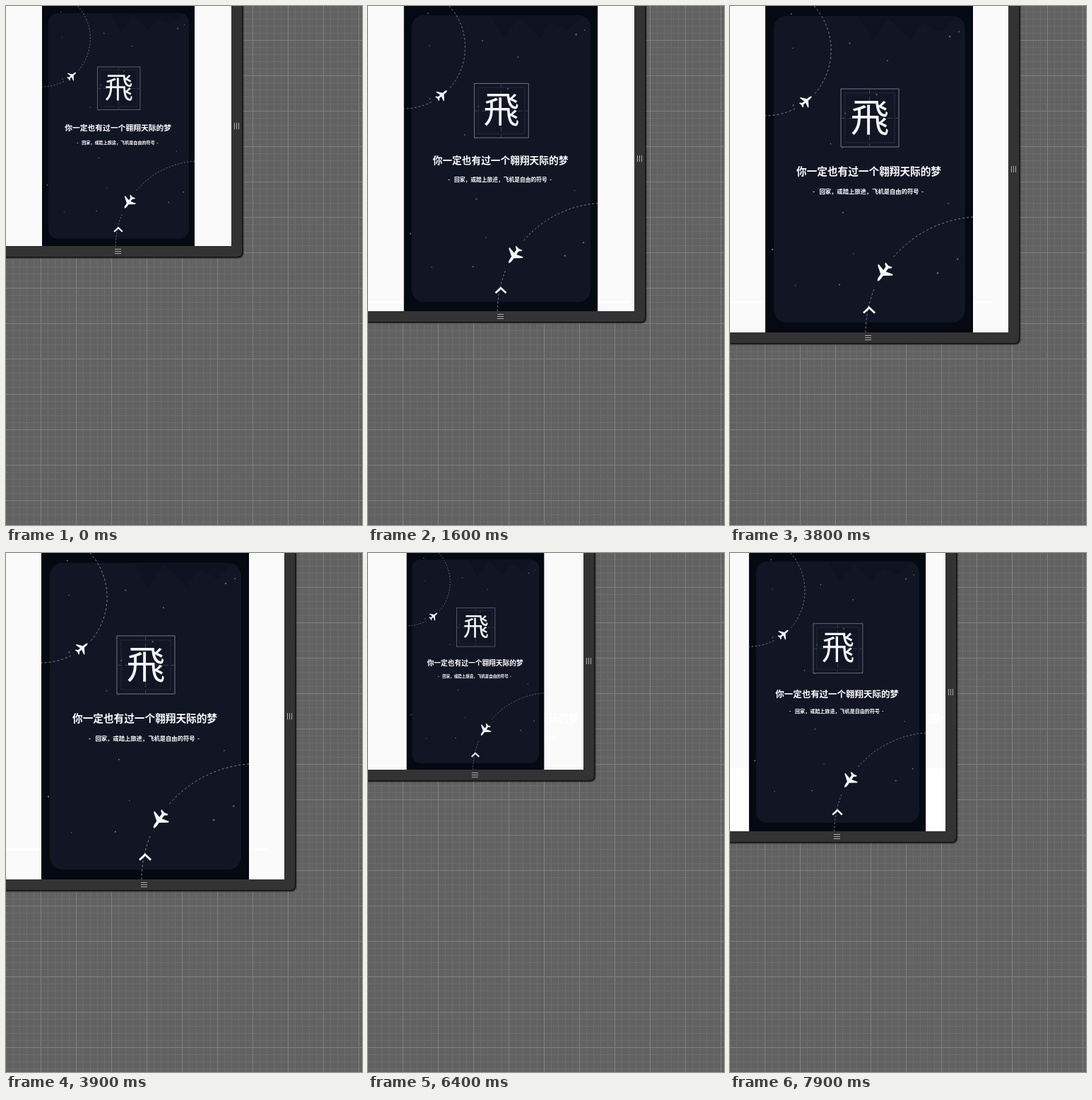
These frames come from a looping animation (504x733 px, 8000 ms). An HTML page:

```html
<!DOCTYPE html>
<html lang="zh-CN">
<head>
<meta charset="utf-8">
<title>Responsive poster</title>
<style>
html, body { margin: 0; width: 100%; height: 100%; overflow: hidden; }
body {
  position: relative;
  background:
    linear-gradient(#808080 1px, transparent 1px) 49px 48px / 50px 50px,
    linear-gradient(90deg, #808080 1px, transparent 1px) 49px 48px / 50px 50px,
    linear-gradient(#6c6c6c 1px, transparent 1px) 9px 8px / 10px 10px,
    linear-gradient(90deg, #6c6c6c 1px, transparent 1px) 9px 8px / 10px 10px,
    #626262;
}
#frame {
  position: absolute; left: -20px; top: -20px;
  background: #333; border-radius: 6px;
  box-shadow: 1px 1px 2px 1px rgba(0, 0, 0, .85);
}
#page { position: absolute; left: 0; top: 0; overflow: hidden; background: #fafafa; }
svg { position: absolute; left: 0; top: 0; width: 504px; height: 733px; }
text { font-family: "Noto Sans CJK SC", "Noto Sans CJK", "Noto Sans CJK JP", sans-serif; text-anchor: middle; }
.grip { position: absolute; }
#gripRight {
  width: 7px; height: 9px;
  background: repeating-linear-gradient(90deg, #aaa 0 1px, transparent 1px 3px);
}
#gripBottom {
  width: 9px; height: 7px;
  background: repeating-linear-gradient(#aaa 0 1px, transparent 1px 3px);
}
</style>
</head>
<body>
<div id="frame"></div>
<div id="page">
  <svg viewBox="0 0 504 733">
    <defs>
      <clipPath id="sheet"><rect x="50" width="294" height="461"/></clipPath>
      <path id="plane" d="M0-10Q1.5-9 1.5-6V-2.5L9 3V4.500L1.500 2.500V6.500L4 8.500V10L0 9L-4 10V8.500L-1.500 6.500V2.500L-9 4.500V3L-1.500-2.500V-6Q-1.500-9 0-10Z"/>
      <g id="words">
        <text x="196.5" y="239" font-size="14.65" font-weight="700">你一定也有过一个翱翔天际的梦</text>
        <g font-size="8.3" font-weight="700">
          <text x="118.5" y="265">-</text>
          <text x="197" y="265">回家，或踏上旅途，飞机是自由的符号</text>
          <text x="272.5" y="265">-</text>
        </g>
      </g>
    </defs>

    <rect id="seam" y="417" width="370" height="3" fill="#fff"/>
    <g id="residue" fill="#fff">
      <rect y="304" width="504" height="429"/>
      <use href="#words"/>
    </g>

    <g id="poster" clip-path="url(#sheet)">
      <rect x="50" width="294" height="461" fill="#050912"/>
      <rect x="62" y="14" width="271" height="433" rx="18" fill="#121524"/>
      <path d="M182 15L202 50L224 17L256 48L272 24L300 36L320 15Z" fill="#0c0f1c" opacity=".4"/>
      <g id="stars" fill="#666b79"></g>
      <g fill="none" stroke="#858a94" stroke-dasharray="3 3">
        <path d="M119 0A93 93 0 0 1 118 126M92 145A93 93 0 0 1 50 155"/>
        <path d="M344 298A163.6 163.6 0 0 0 231 355M204 400A163.6 163.6 0 0 0 192 461"/>
      </g>
      <g fill="none">
        <rect x="157" y="117" width="82" height="82" stroke="#747984"/>
        <rect x="163" y="123" width="70" height="70" stroke="#303546" stroke-dasharray="2 1"/>
        <path d="M157 158.500H239M197.500 117V199" stroke="#3c404e" stroke-dasharray="7 4"/>
      </g>
      <g fill="#f4f7f7">
        <text x="198" y="176.500" font-size="55" font-weight="350">飛</text>
        <use href="#plane" transform="translate(108 134) rotate(50)"/>
        <use href="#plane" transform="translate(217 377) rotate(215) scale(1.4)"/>
      </g>
      <use href="#words" fill="#fff"/>
      <path d="M189 433.500L197 426L205 433.500" fill="none" stroke="#fff" stroke-width="2.800"/>
    </g>
  </svg>
</div>
<div class="grip" id="gripRight"></div>
<div class="grip" id="gripBottom"></div>

<script>
const LOOP = 8000, STEP = 100, SHRINK = 5300;
const POSTER_HEIGHT = 461, POSTER_CENTER = 197;

// Each drag pulls the window corner to a new size.
const drags = [
  { from: 400, to: 900, w: 354, h: 387 },
  { from: 900, to: 1200, w: 370, h: 419 },
  { from: 1400, to: 2100, w: 394, h: 461 },
  { from: SHRINK - STEP, to: SHRINK, w: 305, h: 304 },
  { from: 6300, to: 6400, w: 305, h: 306 },
  { from: 6400, to: 7200, w: 305, h: 364 },
  { from: 7200, to: 7900, w: 305, h: 393 }
];

const el = id => document.getElementById(id);
const mix = (a, b, part) => a + (b - a) * part;
const place = (node, box) => {
  for (const side in box) node.style[side] = box[side] + "px";
};

function seededRandom(seed) {
  return () => (seed = seed * 16807 % 2147483647) / 2147483647;
}

function scatterStars(count) {
  const random = seededRandom(29);
  return Array.from({ length: count }, () => {
    const x = mix(60, 334, random()), y = mix(10, 420, random());
    return `<circle cx="${x}" cy="${y}" r="${mix(0.7, 1.3, random())}"/>`;
  }).join("");
}

function windowAt(time) {
  let w = 319, h = 339;
  for (const drag of drags) {
    const part = Math.min(1, Math.max(0, (time - drag.from) / (drag.to - drag.from)));
    w = mix(w, drag.w, part);
    h = mix(h, drag.h, part);
  }
  return [Math.round(w), Math.round(h)];
}

function draw(time) {
  const [w, h] = windowAt(Math.floor(time / STEP) * STEP);
  place(el("frame"), { width: w + 35, height: h + 35 });
  place(el("page"), { width: w, height: h });
  place(el("gripRight"), { left: w + 4, top: Math.round(h / 2) - 5 });
  place(el("gripBottom"), { left: Math.round(w / 2) - 6, top: h + 4 });
  el("poster").setAttribute("transform",
    `translate(${Math.floor(w / 2)} 0) scale(${h / POSTER_HEIGHT}) translate(${-POSTER_CENTER} 0)`);
  el("seam").style.display = time >= 1500 && time < SHRINK ? "" : "none";
  el("residue").style.display = time >= SHRINK ? "" : "none";
}

el("stars").innerHTML = scatterStars(19);
const start = performance.now();
function tick() {
  draw((performance.now() - start) % LOOP);
  requestAnimationFrame(tick);
}
tick();
</script>
</body>
</html>
```
